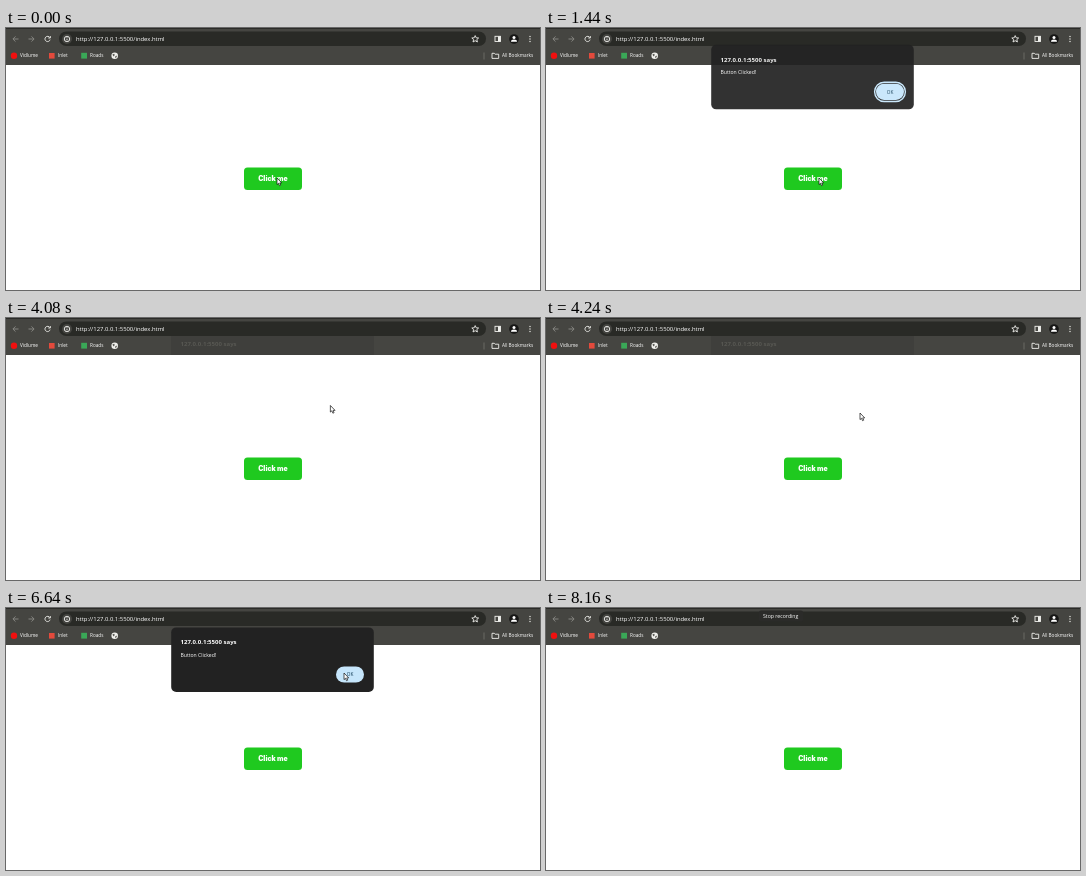
An HTML page for the animation above (8.24 s loop, 534 by 262 pixels).

```html
<!DOCTYPE html>
<html lang="en">
<head>
<meta charset="utf-8">
<title>Button alert</title>
<style>
  html, body { margin: 0; width: 100%; height: 100%; overflow: hidden; background: #fff; }
  svg { display: block; width: 100vw; height: 100vh; }
  text { font-family: "Open Sans", "Noto Sans", sans-serif; font-weight: 500; fill: #fff; }
  .small { font-size: 4.7px; }
  .title { font-size: 6.05px; font-weight: 700; }
  .line { fill: none; stroke: #f0f0ec; stroke-width: .9; }
  .dim { stroke: #8b8b86; }
  .light { fill: #f0f0ec; }
  #dialog, #tooltip, #ghost { opacity: 0; }
</style>
</head>
<body>
<svg viewBox="0 0 534 262">
  <rect width="534" height="262" fill="#fff"/>

  <g id="toolbar">
    <rect width="534" height="37" fill="#454541"/>
    <rect width="534" height="1" fill="#2b2b28"/>
    <rect x="53" y="3.5" width="427" height="14.5" rx="7.25" fill="#292a26"/>
    <path class="line dim" d="M12.5 11H7m2.5-2.6L6.9 11l2.6 2.6M22.5 11H28m-2.5-2.6L28.1 11l-2.6 2.6"/>
    <path class="line" d="M43.8 9.6a2.6 2.6 0 1 0 .3 2M44.3 8v2h-2"/>
    <circle cx="61" cy="11" r="5" fill="#454541"/>
    <circle class="line" cx="61" cy="11" r="2.7"/>
    <path class="line" d="M61 10.7v1.6M61 9.2v.7"/>
    <text x="70" y="13" font-size="5.9">http://127.0.0.1:5500/index.html</text>
    <path class="line" d="M469.2 7.6l1 2.2 2.4.2-1.8 1.6.6 2.4-2.2-1.3-2.2 1.3.6-2.4-1.8-1.6 2.4-.2z"/>
    <rect class="line" x="489" y="8.3" width="5.5" height="5.2"/>
    <rect class="light" x="492" y="8.3" width="2.5" height="5.2"/>
    <circle cx="508" cy="11" r="4.8" fill="#171716"/>
    <circle cx="508" cy="9.5" r="1.5" fill="#fff"/>
    <path d="M505 13.7q0-2.2 3-2.2t3 2.2z" fill="#fff"/>
    <g class="light">
      <circle cx="524" cy="8.5" r=".7"/><circle cx="524" cy="11" r=".7"/><circle cx="524" cy="13.5" r=".7"/>
    </g>

    <circle cx="8" cy="27.7" r="3.2" fill="#f00f0f"/>
    <text class="small" x="14" y="29.4">Vidlume</text>
    <rect x="43" y="25" width="5.6" height="5.6" fill="#e34a3c"/>
    <text class="small" x="52" y="29.4">Inlet</text>
    <rect x="75.2" y="24.8" width="5.8" height="5.8" fill="#3aa757"/>
    <text class="small" x="84" y="29.4">Roads</text>
    <circle class="light" cx="108.7" cy="27.7" r="3.3"/>
    <path d="M106.4 26.5l1.7-.8.7 1.2-1.2 1.6zM109.3 28.2l1.9-.6-.9 2-1.2.4z" fill="#55554f"/>
    <path d="M478 24.5v7" stroke="#74746e" stroke-width=".8"/>
    <path class="line" d="M486 25.3h2.3l.8.9h3.6v4.2H486z"/>
    <text class="small" x="496" y="29.4">All Bookmarks</text>
  </g>

  <rect x="238" y="139.5" width="58" height="22.5" rx="3.5" fill="#1fc91f"/>
  <text x="267" y="153.2" text-anchor="middle" style="font:900 6.9px Inter,sans-serif">Click me</text>

  <g id="ghost">
    <rect x="165" y="18" width="203" height="19" fill="#3f3f3c"/>
    <text class="title" x="174.5" y="28.2" style="fill:#585853">127.0.0.1:5500 says</text>
  </g>

  <g id="dialog">
    <rect x="165.2" y="19.4" width="202.6" height="64.6" rx="5" fill="#222"/>
    <text class="title" x="174.5" y="36.2">127.0.0.1:5500 says</text>
    <text x="174.5" y="48.7" font-size="5.1">Button Clicked!</text>
    <rect id="ring" x="328.6" y="56.9" width="30.8" height="19.2" rx="9.6" fill="none" stroke="#c6e6fb" stroke-width="1.4"/>
    <rect x="330" y="58.4" width="28" height="16.2" rx="8.1" fill="#c6e6fb"/>
    <text class="small" x="344" y="68.3" text-anchor="middle" style="fill:#123c56">OK</text>
  </g>

  <g id="tooltip">
    <rect x="213" y="2.5" width="44" height="11" rx="2" fill="#2b2b29"/>
    <text x="217" y="10" font-size="5.2">Stop recording</text>
  </g>

  <path id="cursor" d="M0 0v6.6l1.5-1.3 1 2.4 1.2-.5-1-2.3h2z" fill="#fff" stroke="#111" stroke-width=".7" stroke-linejoin="round"/>
</svg>
<script>
  const LOOP = 8240, STEP = 80;
  const alerts = [{ open: 1360, close: 3680 }, { open: 5440, close: 6720 }];
  const home = { x: 271, y: 150 };
  const moves = [
    { start: 560, end: 1120, x: 273, y: 150 },
    { start: 2720, end: 3200, x: 354, y: 66 },
    { start: 3760, end: 4240, x: 314, y: 95 },
    { start: 4240, end: 4480, x: 272, y: 152 },
    { start: 4480, end: 4640, x: 265, y: 163 },
    { start: 4880, end: 5200, x: 268, y: 149 },
    { start: 5520, end: 6240, x: 338, y: 65 },
    { start: 6720, end: 7360, x: 234, y: -10 }
  ];

  const byId = id => document.getElementById(id);
  const ramp = (t, start, end) => Math.min(1, Math.max(0, (t - start) / (end - start)));
  const smooth = p => p * p * (3 - 2 * p);
  const place = (id, x, y) => byId(id).setAttribute("transform", `translate(${x} ${y})`);
  const fade = (id, opacity) => { byId(id).style.opacity = opacity; };

  function drawAlert(t) {
    const { open, close } = alerts.findLast(a => t >= a.open) ?? alerts[0];
    const shown = ramp(t, open - STEP, open + 3 * STEP);
    const gone = ramp(t, close - STEP, close + 2 * STEP);
    const visible = t >= open ? Math.min(1, 1.85 * shown) * (1 - gone) : 0;
    place("dialog", 0, -7 * (1 - shown) ** 1.4 - 8 * gone);
    fade("dialog", visible);
    fade("ring", t < close - 2 * STEP ? 1 : 0);
    fade("ghost", gone === 1 && t < close + 8 * STEP ? 1 : 0);
  }

  function drawCursor(t) {
    let { x, y } = home;
    for (const move of moves) {
      const p = smooth(ramp(t, move.start, move.end));
      x += (move.x - x) * p;
      y += (move.y - y) * p;
    }
    place("cursor", x, y);
  }

  function draw(now) {
    const t = Math.floor((now % LOOP) / STEP) * STEP;
    drawAlert(t);
    drawCursor(t);
    fade("tooltip", ramp(t, 7920, 8160));
    requestAnimationFrame(draw);
  }
  requestAnimationFrame(draw);
</script>
</body>
</html>
```
